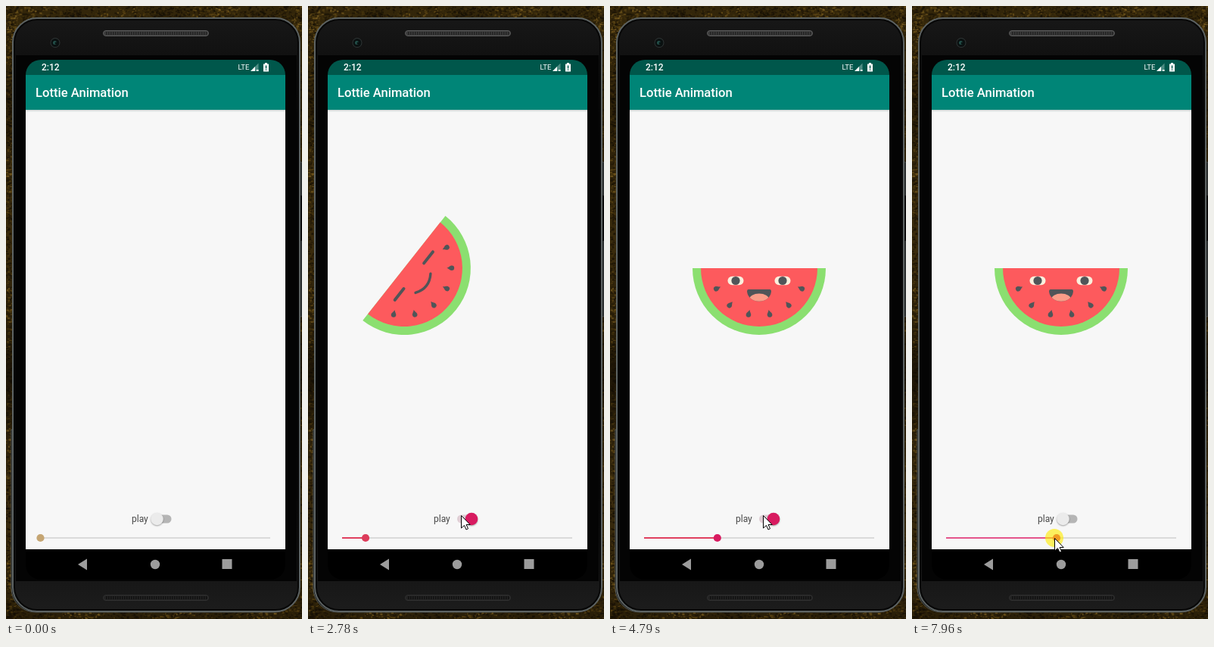
An HTML page with a canvas for the animation above (8 s loop, 391 by 809 pixels).

```html
<!DOCTYPE html>
<html lang="en">
<head>
<meta charset="utf-8">
<title>Lottie Animation</title>
<style>
html, body { margin: 0; width: 100%; height: 100%; overflow: hidden; background: #1d1507; }
canvas { display: block; width: 100vw; height: 100vh; }
</style>
</head>
<body>
<canvas id="stage" width="391" height="809"></canvas>
<script>
const W = 391, H = 809, LOOP = 8000, TAU = Math.PI * 2;
const ctx = document.getElementById('stage').getContext('2d');
const PINK = '#d81b60', DARK = '#505558';

const clamp = v => Math.max(0, Math.min(1, v));
const ramp = (t, a, b) => clamp((t - a) / (b - a));
const mix = (a, b, p) => a + (b - a) * p;

// Smooth curve through [time, value] keys, level at every extreme.
function curve(keys, t) {
  const last = keys.length - 1;
  if (t <= keys[0][0]) return keys[0][1];
  if (t >= keys[last][0]) return keys[last][1];
  const i = keys.findIndex(k => k[0] > t) - 1;
  const slope = n => {
    if (n === 0 || n === last) return 0;
    const [a, b, c] = [keys[n - 1], keys[n], keys[n + 1]];
    return (b[1] - a[1]) * (c[1] - b[1]) <= 0 ? 0 : (c[1] - a[1]) / (c[0] - a[0]);
  };
  const [t0, v0] = keys[i], [t1, v1] = keys[i + 1], d = t1 - t0, u = (t - t0) / d;
  return v0 + (v1 - v0) * u * u * (3 - 2 * u)
    + d * u * (1 - u) * (slope(i) * (1 - u) - slope(i + 1) * u);
}

function disc(g, x, y, r, fill) {
  g.fillStyle = fill;
  g.beginPath(); g.arc(x, y, r, 0, TAU); g.fill();
}
function box(g, x, y, w, h, r, fill, stroke, line = 1) {
  g.beginPath(); g.roundRect(x, y, w, h, r);
  if (fill) { g.fillStyle = fill; g.fill(); }
  if (stroke) { g.strokeStyle = stroke; g.lineWidth = line; g.stroke(); }
}
function shape(g, d, fill) {
  g.fillStyle = fill; g.fill(new Path2D(d));
}
function label(g, text, x, y, size, weight, fill) {
  g.font = `${weight} ${size}px Roboto, sans-serif`;
  g.fillStyle = fill;
  g.fillText(text, x, y);
}
function gradient(g, y0, y1, ...colors) {
  const fill = g.createLinearGradient(0, y0, 0, y1);
  colors.forEach((c, i) => fill.addColorStop(i / (colors.length - 1), c));
  return fill;
}

function drawWallpaper(g) {
  let seed = 7;
  const random = () => (seed = (seed * 16807) % 2147483647) / 2147483647;
  g.fillStyle = gradient(g, 0, H, '#33260a', '#2c2008', '#3a2b0c', '#1e1606', '#3a2b0d', '#2a1f08');
  g.fillRect(0, 0, W, H);
  const tones = ['#0f0b04', '#1a1206', '#4a370f', '#6d5219', '#8c6c27'];
  for (let i = 0; i < 5200; i++) {
    const side = random();
    const x = side < .35 ? random() * 14 : side < .45 ? 378 + random() * 13 : random() * W;
    const y = side < .45 ? random() * H : side < .75 ? random() * 34 : 780 + random() * 29;
    const wave = Math.sin(x * .05 + y * .035) * .5 + .5;
    g.fillStyle = tones[Math.floor(random() * (2 + wave * 3))];
    g.globalAlpha = .55;
    g.fillRect(x, y, 1 + random() * 3, 1 + random() * 1.5);
  }
  g.globalAlpha = 1;
}

function drawPhone(g) {
  box(g, 387, 206, 4, 204, 1, '#202323', '#4a4f4f');
  box(g, 388, 250, 3, 60, 1, '#0b0b0b');
  box(g, 7, 559, 380, 241, [0, 0, 32, 32], '#111', '#555b5b');
  box(g, 9, 16, 379, 783, 32, '#070707', '#5d6363', 2);
  box(g, 12, 19, 373, 777, 29, gradient(g, 19, 796, '#171717', '#0d0d0d', '#050505', '#050505', '#050505',
    '#050505', '#050505', '#050505', '#070707', '#121212', '#1c1c1c'));
  g.fillStyle = '#040404';
  g.fillRect(13, 65, 371, 694);
  for (const [y, tone, dot] of [[32, '#3c3c3c', '#232323'], [777, '#232323', '#111']]) {
    box(g, 128.5, y + .5, 139, 7, 3.5, tone, y < 99 ? '#5c5c5c' : '#303030');
    g.fillStyle = dot;
    for (let x = 132; x < 265; x += 3) g.fillRect(x, y + 2, 1.5, 4);
  }
  disc(g, 65, 48.5, 6.5, '#303636');
  disc(g, 65, 48.5, 5.5, '#0a1010');
  disc(g, 64.5, 48.5, 2.5, '#23504a');
  disc(g, 66, 49, 1.5, '#081212');
}

function drawScreen(g) {
  g.save();
  g.beginPath(); g.roundRect(26, 71, 343, 686, 20); g.clip();
  const bands = [[71, 20, '#00574b'], [91, 46, '#008577'], [137, 580, '#f7f7f7'], [717, 40, '#000']];
  for (const [y, h, fill] of bands) {
    g.fillStyle = fill;
    g.fillRect(26, y, 343, h);
  }
  g.fillStyle = gradient(g, 137, 140, '#c9d2d0', '#f7f7f7');
  g.fillRect(26, 137, 343, 3);
  g.restore();

  label(g, '2:12', 47, 85, 12, 500, '#fff');
  label(g, 'LTE', 306.5, 84, 9.5, 400, '#fff');
  shape(g, 'M323 86L333.5 75.5V86Z', '#4f8d84');
  shape(g, 'M323 86L329 80V86Z M331 84h2.5v2h-2.5z', '#fff');
  shape(g, 'M340 76.5h2v-1.5h3v1.5h2V86.5h-7z', '#fff');
  shape(g, 'M342.8 78.5h1.5v4h-1.5z M342.8 83.5h1.5v1.3h-1.5z', '#00574b');
  label(g, 'Lottie Animation', 39, 120, 16.6, 500, '#fff');
  label(g, 'play', 166, 681, 12, 400, '#484848');

  shape(g, 'M95 737L107 729.5V744.5Z', '#9c9c9c');
  disc(g, 197, 737, 6.2, '#9c9c9c');
  g.fillStyle = '#9c9c9c';
  g.fillRect(285.5, 730, 13, 13);
}

const rollX = [[2280, -70], [2780, 126.5], [2860, 150], [3230, 216], [3770, 184], [4400, 197]];
const rollAngle = [[2280, -52], [2780, -51.7], [2860, -29], [3230, 16], [3770, -10.9], [4400, 0]];

function hop(t) {
  if (t < 4400) return 0;
  const u = ramp((t - 4010) % 780, 546, 764);
  return 28 * 4 * u * (1 - u);
}

function drawFace(eyes, mouth) {
  ctx.lineCap = 'round';
  ctx.strokeStyle = DARK;
  ctx.lineWidth = 4;
  for (const x of [-31, 31]) {
    if (eyes < .3) {
      ctx.beginPath(); ctx.moveTo(x - 9.5, 16.5); ctx.lineTo(x + 9.5, 16.5); ctx.stroke();
    } else {
      box(ctx, x - 10.5, 16.5 - 5.7 * eyes, 21, 11.4 * eyes, 5.7 * eyes, '#faf0dd');
      ctx.fillStyle = DARK;
      ctx.beginPath(); ctx.ellipse(x, 16.5, 5.6, 5.6 * eyes, 0, 0, TAU); ctx.fill();
    }
  }
  if (mouth < .25) {
    ctx.lineWidth = 3.4;
    ctx.stroke(new Path2D('M-16 32Q0 43 16 32'));
    return;
  }
  ctx.save();
  ctx.translate(0, 28);
  ctx.scale(1, mouth);
  const lips = new Path2D('M-14 0H14Q16 0 16 3C14 20-14 20-16 3Q-16 0-14 0Z');
  ctx.fillStyle = DARK;
  ctx.fill(lips);
  ctx.clip(lips);
  ctx.fillStyle = '#fb9d88';
  ctx.beginPath(); ctx.ellipse(0, 13.5, 13, 8, 0, 0, TAU); ctx.fill();
  ctx.restore();
}

function drawMelon(t) {
  if (t < 2280) return;
  ctx.save();
  ctx.beginPath(); ctx.rect(26, 137, 343, 580); ctx.clip();
  ctx.translate(curve(rollX, t), 346 - hop(t));
  ctx.rotate(curve(rollAngle, t) * Math.PI / 180);
  for (const [r, fill] of [[88, '#8bdf70'], [77, '#fd5a5d']]) {
    ctx.fillStyle = fill;
    ctx.beginPath(); ctx.arc(0, 0, r, 0, Math.PI); ctx.fill();
  }
  for (let i = 1; i < 7; i++) {
    ctx.save();
    ctx.rotate(i * Math.PI / 7);
    shape(ctx, 'M56.5 0C60-1.5 61-3.3 63-3.3A3.3 3.3 0 0 1 63 3.3C61 3.3 60 1.5 56.5 0Z', DARK);
    ctx.restore();
  }
  drawFace(ramp(t, 3380, 3520), ramp(t, 4420, 4600));
  ctx.restore();
}

function drawSwitch(t) {
  const on = ramp(t, 2060, 2300) * (1 - ramp(t, 6500, 6680));
  const lit = on > 0;
  box(ctx, mix(199, 197, on), 671.5, mix(19.5, 21, on), 11, 5.5,
    !lit ? '#b5b5b5' : on < 1 ? '#efb5c9' : '#dfcdd4');
  ctx.save();
  ctx.shadowColor = 'rgba(0,0,0,.35)';
  ctx.shadowBlur = 2;
  ctx.shadowOffsetY = 1;
  disc(ctx, mix(199.5, 216, on), 677, 8.3, on > .5 ? PINK : '#ebebeb');
  ctx.restore();
}

function drawSlider(t) {
  const x = t < 2100 ? 45.5 : t < 2780 ? mix(45.5, 76, ramp(t, 2100, 2780))
    : t < 3790 ? mix(76, 110, ramp(t, 2780, 3790)) : mix(110, 191, ramp(t, 3790, 6340));
  const stopped = t > 6500;
  ctx.fillStyle = '#dadada';
  ctx.fillRect(45, 701, 304, 2);
  ctx.fillStyle = stopped ? '#e4558b' : '#e0405f';
  ctx.fillRect(45, 701, x - 45, 2);
  disc(ctx, x, 702, 5.1, t < 2100 ? '#c5a572' : t < 4600 ? '#dd3c5b' : PINK);
}

function drawPointer(t) {
  if (t < 830) return;
  const enter = ramp(t, 790, 1300), drop = ramp(t, 7300, 7500);
  const ease = 1 - (1 - enter) ** 2;
  let x = mix(246, 202, ease), y = mix(806, t < 1530 ? 673 : 672, ease);
  if (t >= 5530) x = mix(204.5, 188, drop);
  y = mix(y, 702, drop);
  const pressed = (t >= 1700 && t < 1770) || (t >= 6400 && t < 6480) || t >= 7950;
  if (pressed) disc(ctx, x, y, 12, 'rgba(255,236,0,.62)');
  ctx.save();
  ctx.translate(x + .5, y + .5);
  const arrow = new Path2D('M0 0V16.5L4 13L6.5 18.5L9 17.3L6.6 12H11.7Z');
  ctx.fillStyle = '#fff';
  ctx.fill(arrow);
  ctx.strokeStyle = '#000';
  ctx.lineWidth = 1;
  ctx.lineCap = 'butt';
  ctx.stroke(arrow);
  ctx.restore();
}

const backdrop = document.createElement('canvas');
backdrop.width = W;
backdrop.height = H;
const back = backdrop.getContext('2d');
drawWallpaper(back);
drawPhone(back);
drawScreen(back);

const start = performance.now();
function frame() {
  const t = (performance.now() - start) % LOOP;
  ctx.drawImage(backdrop, 0, 0);
  drawMelon(t);
  drawSwitch(t);
  drawSlider(t);
  drawPointer(t);
  requestAnimationFrame(frame);
}
frame();
</script>
</body>
</html>
```
